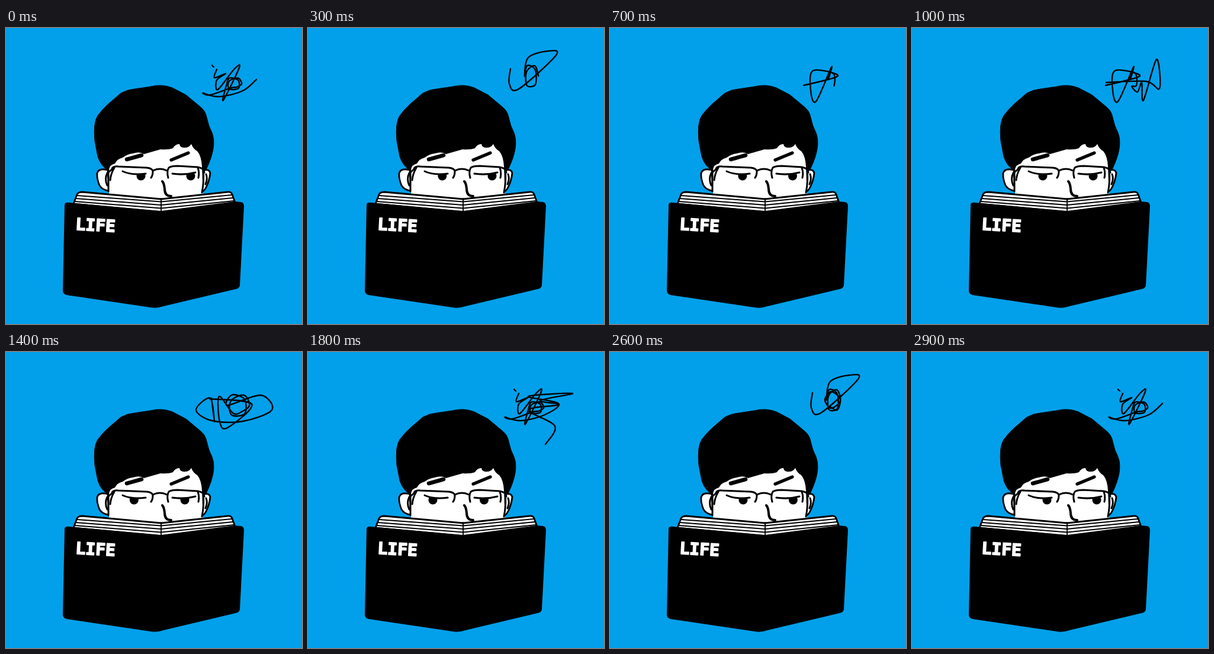
Write an HTML page that moves like this. It is 500x500 px and loops after 3 s.

```html
<!DOCTYPE html>
<html lang="en">
<head>
<meta charset="utf-8">
<title>Reading</title>
<style>
html, body { margin: 0; width: 100%; height: 100%; overflow: hidden; background: #02a0ea; }
svg { display: block; width: 100%; height: 100%; }
.line { fill: none; stroke: #000; stroke-width: 3; stroke-linecap: round; stroke-linejoin: round; }
.paper { fill: #fff; stroke: #000; stroke-width: 2.8; stroke-linejoin: round; }
text { font: bold 28px "DejaVu Sans Mono", monospace; fill: #fff; stroke: #fff; stroke-width: 1.8; stroke-linejoin: round; }
</style>
</head>
<body>
<svg viewBox="0 0 500 500">
  <clipPath id="underLids"><path d="M180 246H340V270H180Z"/></clipPath>
  <!-- ears, hair, face -->
  <path class="paper" d="M172 240Q157 236 154 245Q153 254 158 266Q163 274 174 275Z"/>
  <path class="paper" d="M333 241Q343 237 345 245Q344 256 339 267Q336 274 331 277Z"/>
  <path stroke="#000" d="M150 191Q147 160 155 148Q163 137 172 129L194 110Q205 104 217 103L244 99Q263 94 281 101L304 113L328 133Q337 140 339 151Q342 166 348 177Q357 200 338 239L175 242Q160 234 155 217Z"/>
  <path fill="#fff" d="M174 292V239Q175 231 184 229Q188 221 197 219Q205 213 214 212Q226 208 233 213L261 205Q274 206 282 203Q286 196 293 196Q294 203 303 202Q309 202 313 196Q316 204 323 208Q330 216 331 234L333 292Z"/>
  <g class="line">
    <path d="M173 240V276M333 240Q335 258 331 278M171 245Q166 255 171 266M338 247Q341 254 337 264"/>
    <!-- glasses -->
    <path d="M172 244Q178 241 180 236Q183 233 190 234L238 236Q247 237 248 242Q248 249 245 253M248 241Q260 235 272 241M274 253Q271 242 275 236Q279 233 290 233L324 235Q335 237 335 244M183 236Q177 246 176 257M324 236Q327 244 325 253"/>
    <!-- lids, nose, brows -->
    <path d="M197 242Q211 249 236 246M281 246Q301 249 320 244"/>
    <path stroke-width="4" d="M264 259Q267 262 268 272Q268 284 279 284"/>
    <path stroke-width="6.5" d="M204 222L229 215"/>
    <path stroke-width="5.2" d="M279 223L308 211"/>
  </g>
  <g clip-path="url(#underLids)">
    <circle id="left" cy="250" r="7.5"/>
    <circle id="right" cy="250" r="7.5"/>
  </g>
  <!-- book -->
  <path class="paper" d="M114 297L120 281Q122 277 129 277L262 289L374 277Q380 276 382 281L387 295L262 311Z"/>
  <path id="pages" class="line" style="stroke-width: 1.9"/>
  <path d="M99 298Q100 294 107 295L117 296L262 309L386 293L397 294Q402 295 402 301L395 435Q394 440 388 441L266 470Q255 474 244 472L102 451Q96 449 96 444Z"/>
  <text x="117" y="341" transform="rotate(3 117 341)">LIFE</text>
  <path id="scribble" class="line" style="stroke-width: 2.4"/>
</svg>
<script>
const LOOP = 3000, STEP = 100;
const $ = id => document.getElementById(id);

const points = text => text.split(', ').map(p => p.split(' ').map(Number));

// Loops of changing size around one centre, six points a turn.
const coil = (x, y, rx, ry, turns) => Array.from({ length: turns * 6 }, (_, i) => {
  const a = i * Math.PI / 3, size = .8 + .2 * Math.sin(i * 1.7);
  return [x - rx * size * Math.cos(a), y - ry * size * Math.sin(a)];
});

// A pen trail runs in, coils up and runs out.
const trail = (head, loops, tail) => [...points(head), ...coil(...loops), ...points(tail)];

const knot = trail('356 70, 352 84, 371 77, 356 88, 358 104, 385 70, 394 67, 367 122', [385, 94, 15, 11, 2],
  '345 113, 333 110, 360 116, 400 106, 423 87, 372 75, 447 70, 392 82, 424 89, 372 98, 417 125, 401 156');
const curl = trail('342 69, 340 94, 356 103, 419 46, 405 39, 372 50', [377, 81, 14, 20, 3],
  '400 95, 385 114, 387 138, 428 78, 440 92, 434 135, 411 105, 438 92');
const peaks = trail('327 97, 385 81, 343 72, 339 105, 348 124, 374 66', [375, 87, 8, 14, 1],
  '381 108, 388 92, 391 122, 413 53, 418 102, 395 90, 328 92');
const eye = trail('347 78, 352 118, 345 78, 321 98, 348 116, 400 117, 449 98, 430 73', [392, 90, 22, 20, 2],
  '360 75, 361 118, 374 128, 415 88, 344 79');
const flick = trail('320 78, 350 79, 366 75, 340 104, 344 122, 374 65', [372, 93, 15, 12, 2],
  '381 68, 410 82, 390 97, 338 95, 395 116, 417 87, 406 92');

// start time, trail, share drawn at first, share added per step
const schedule = [
  [0, knot, .78, .22], [300, curl, .5, .25], [600, peaks, .4, .2],
  [1300, eye, .8, .2], [1700, knot, .78, .22], [2000, flick, .4, .2],
  [2500, curl, .5, .25], [2900, knot, .78, 0]
];

// Smooth curve through all points
function smooth(p) {
  const at = i => p[Math.max(0, Math.min(p.length - 1, i))];
  let d = 'M' + p[0];
  for (let i = 0; i < p.length - 1; i++) {
    const [a, b, c, e] = [at(i - 1), at(i), at(i + 1), at(i + 2)];
    const c1 = b.map((v, k) => v + (c[k] - a[k]) / 6);
    const c2 = c.map((v, k) => v - (e[k] - b[k]) / 6);
    d += `C${c1} ${c2} ${c}`;
  }
  return d;
}

let pages = 'M262 288V310';
for (let k = 1; k <= 3; k++) {
  const y = 278 + k * 5, spine = 288 + k * 5.5;
  pages += `M${122 - k * 2} ${y}L262 ${spine}L${379 + k * 2} ${y - 1}`;
}
$('pages').setAttribute('d', pages);

function draw(now) {
  const t = Math.floor(now % LOOP / STEP) * STEP;
  const glance = 18.5 * (t < 1900 ? t / 1900 : Math.max(0, 2900 - t) / 1000) ** 1.5;
  $('left').setAttribute('cx', 228 - glance);
  $('right').setAttribute('cx', 312 - glance * .85);

  const [start, pen, first, add] = schedule.findLast(s => s[0] <= t);
  const share = Math.min(1, first + add * (t - start) / STEP);
  const dot = pen == knot ? 'M348 63L351 66' : '';
  $('scribble').setAttribute('d', dot + smooth(pen.slice(0, Math.round(pen.length * share))));
  requestAnimationFrame(draw);
}
requestAnimationFrame(draw);
</script>
</body>
</html>
```
